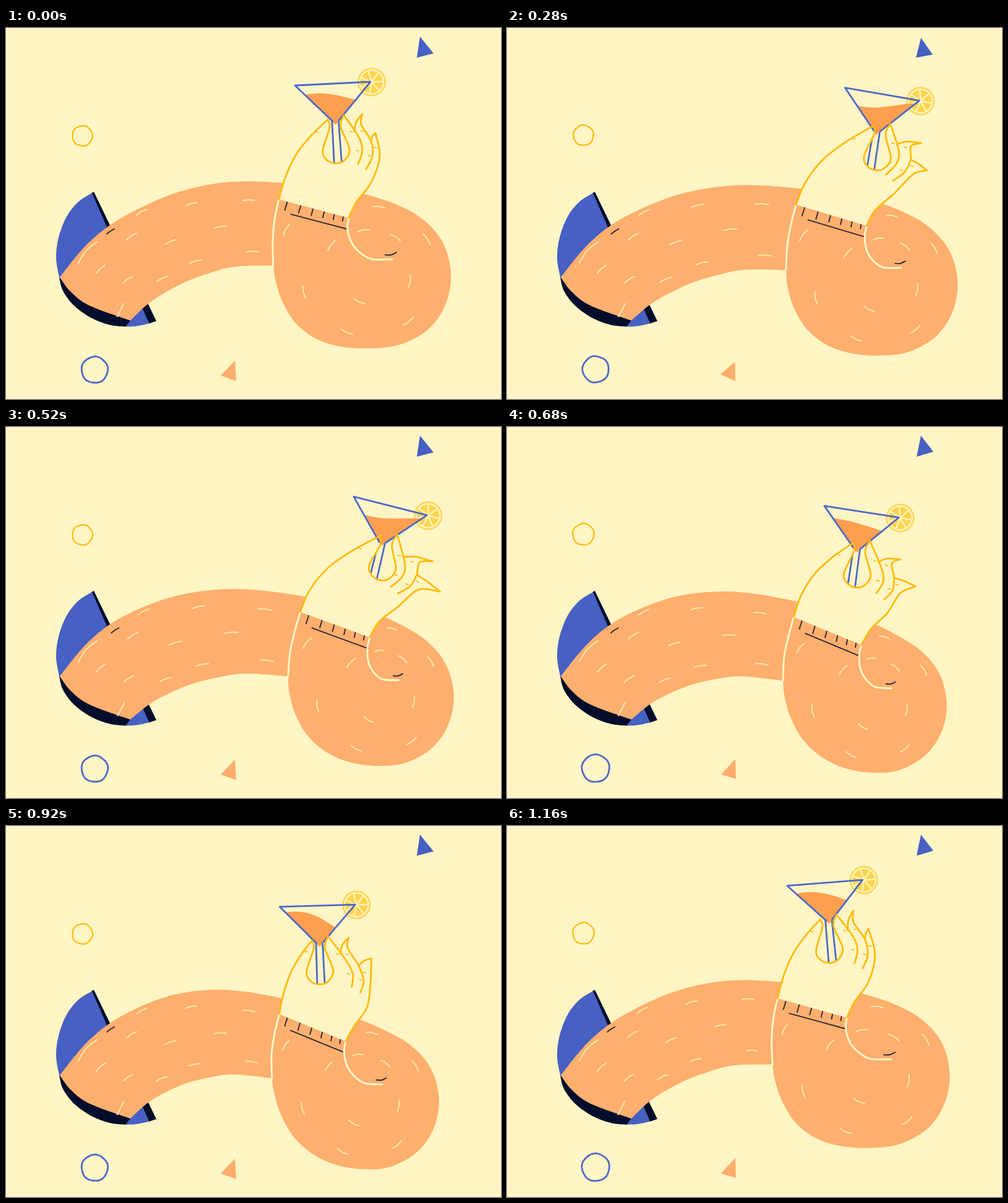
An HTML page with a canvas that plays this animation: 800 px wide and 600 px high, repeating every 1200 ms.

```html
<!DOCTYPE html>
<html lang="en">
<head>
<meta charset="utf-8">
<title>Cocktail arm</title>
<style>
html, body { margin: 0; width: 100%; height: 100%; overflow: hidden; background: #fff5c5; }
canvas { display: block; width: 800px; height: 600px; }
</style>
</head>
<body>
<canvas id="stage" width="800" height="600"></canvas>
<script>
const ctx = document.getElementById('stage').getContext('2d');
const CREAM = '#fff5c5', SKIN = '#ffaf6e', BLUE = '#4660c3', DARK = '#020d2b';
const GOLD = '#ffbb0a', INK = '#2b2838', DRINK = '#ff9f50', LEMON = '#ffd44f';
const LINE = '#4c69c9', PITH = '#fff3b8', HAIR = '#ffe6ad';
const TAU = Math.PI * 2;

// Two motions drive everything: the wrist sways sideways and the elbow dips.
const LOOP = 1200, STEP = 80, HOLD = 120;
const KEYS = [0, 120, 280, 520, 760, 1000, 1160];
const SWAY = [0, 6, 28, 37, 16, -5, -4];
const DIP = [0, 1, 14, 36, 52, 36, 3];
let sway = 0, dip = 0, tilt = 0, time = 0;

const pairs = list => {
  const out = [];
  for (let i = 0; i < list.length; i += 2) out.push([list[i], list[i + 1]]);
  return out;
};
const add = (p, dx, dy) => [p[0] + dx, p[1] + dy];
const lerp = (a, b, k) => [a[0] + (b[0] - a[0]) * k, a[1] + (b[1] - a[1]) * k];
const ramp = (x, from, to) => {
  const u = Math.min(1, Math.max(0, (x - from) / (to - from)));
  return u * u * (3 - 2 * u);
};

// Periodic cubic through the key values.
function keyed(values, t) {
  const n = KEYS.length;
  const at = i => KEYS[(i + n) % n] + LOOP * Math.floor(i / n);
  const val = i => values[(i + n) % n];
  const slope = i => (val(i + 1) - val(i - 1)) / (at(i + 1) - at(i - 1));
  let i = n - 1;
  while (at(i) > t) i--;
  const d = at(i + 1) - at(i), u = (t - at(i)) / d, v = 1 - u;
  return val(i) + (val(i + 1) - val(i)) * u * u * (3 - 2 * u)
    + d * u * v * (v * slope(i) - u * slope(i + 1));
}

// Arm and elbow: fixed at the sleeve, looser to the right, widest sway at the wrist.
function bend([x, y]) {
  const wrist = Math.exp(-((x - 510) ** 2 + (y - 290) ** 2) / 11000);
  const side = 0.55 * ramp(x, 150, 420) + 0.6 * wrist;
  const back = 0.06 * ramp(x, 170, 400) * ramp(y, 290, 360) + 0.38 * ramp(x, 480, 680);
  const down = ramp(x, 170, 670) * (1.03 - 0.0008 * (y - 350));
  return [x + sway * side - dip * back, y + dip * down];
}
const bent = list => pairs(list).map(bend);

// Hand: leans more the higher a point is above the cuff; fan spreads the fingertips.
function lean([x, y], fan = 0) {
  const height = 277 + (x - 441) * 0.265 - y;
  const k = (height / 110) ** 2;
  const spread = Math.max(0, x - 540) * 0.008 * k;
  return [
    x + sway * (1 + k + 0.1 * fan) - dip * (0.05 + 0.3 * k - 0.2 * fan),
    y + sway * (spread + 0.42 * fan) + dip * (0.85 + (x - 540) * 0.002)
  ];
}
const leant = (list, fan) => pairs(list).map(p => lean(p, fan));

// Thumb and index move as one piece around the stem.
function pinch(list) {
  const pivot = [533, 150], [px, py] = lean(pivot);
  const c = Math.cos(tilt * 0.7), s = Math.sin(tilt * 0.7);
  return pairs(list).map(([x, y]) => {
    const dx = x - pivot[0], dy = y - pivot[1];
    return [px + dx * c - dy * s, py + dx * s + dy * c];
  });
}

// Adds a smooth run through the points to the current path.
function run(pts, join) {
  if (join) ctx.lineTo(...pts[0]);
  else ctx.moveTo(...pts[0]);
  for (let i = 0; i < pts.length - 1; i++) {
    const a = pts[i], b = pts[i + 1];
    const p = pts[i - 1] || a, n = pts[i + 2] || b;
    ctx.bezierCurveTo(
      a[0] + (b[0] - p[0]) / 6, a[1] + (b[1] - p[1]) / 6,
      b[0] - (n[0] - a[0]) / 6, b[1] - (n[1] - a[1]) / 6, b[0], b[1]);
  }
}
function trace(runs) {
  ctx.beginPath();
  runs.forEach((r, i) => run(r, i > 0));
}
function fill(color, ...runs) {
  trace(runs);
  ctx.fillStyle = color;
  ctx.fill();
}
function stroke(color, width, ...runs) {
  trace(runs);
  ctx.strokeStyle = color;
  ctx.lineWidth = width;
  ctx.stroke();
}

function ring(x, y, r, color, width, phase) {
  const pts = [];
  for (let a = 0; a < TAU + 0.1; a += TAU / 30) {
    const q = r + 0.4 * Math.cos(5 * a + phase);
    pts.push([x + q * Math.cos(a), y + q * Math.sin(a)]);
  }
  stroke(color, width, pts);
}

// Loose shapes jitter between three drawings.
function drawConfetti(k) {
  const left = [0, 2, 3][k], low = k === 2 ? 2 : 0, grow = k === 1 ? 1 : 0;
  fill(BLUE, [[669, 14 + low]], [[691 - left, 41 + low - grow]], [[664 - left, 48]]);
  fill('#ffad6c', [[370 - left / 2, 538 + low - grow]], [[372 - left, 571 - 2 * grow]], [[347 - left * 0.7, 562 - low]]);
  ring(123.5, k ? 173.5 : 174.5, 16.3 + grow, GOLD, 2.2, k);
  ring(143.3, k ? 552 : 552.8, 21.2 + grow, LINE, 2.8, k + 1);
}

function drawSleeve() {
  fill(DARK, [[142, 265]], [[243, 474]], [[231, 478]], [[138, 267]]);
  fill(BLUE, pairs([139, 267, 117, 281, 98, 305, 85, 339, 81, 372, 86, 403]),
    pairs([193, 483, 212, 482, 231, 478]));
  fill(DARK, pairs([86, 403, 92, 425, 110, 449, 138, 469, 167, 480, 193, 483]),
    pairs([201, 473, 135, 447, 86, 403]));
}

function hair(p, angle, half, bow) {
  const c = Math.cos(angle), s = Math.sin(angle);
  stroke(HAIR, 2, [add(p, -c * half, -s * half), add(p, s * bow, -c * bow), add(p, c * half, s * half)].map(bend));
}

function drawHairs() {
  pairs([219, 298, 299, 285, 392, 279, 203, 337, 266, 346, 347, 322, 153, 390, 197, 407, 252, 406, 306, 378, 399, 362])
    .forEach(p => hair(p, (p[0] - 400) * 0.003, 9.5, 1));
  hair([185, 456], -1.1, 12, 0);
  hair([132, 363], -0.85, 23, 4);
  const hub = [590, 400];
  pairs([453, 327, 526, 352, 482, 427, 572, 442, 551, 491, 650, 474, 652, 409, 680, 342, 629, 339, 602, 290, 578, 328])
    .forEach(p => hair(p, Math.atan2(p[1] - hub[1], p[0] - hub[0]) + TAU / 4, 10, 1.5));
}

function drawArm() {
  const seam = bent([441, 277, 434, 310, 431, 345, 432, 384]);
  const wrist = seam[0], cuff = bend([554, 307]);
  fill(SKIN,
    [[87, 403], ...bent([126, 355, 165, 321, 211, 294, 270, 268, 330, 253, 390, 248, 470, 252])],
    seam,
    [...bent([432, 384, 370, 386, 330, 396, 285, 413, 235, 442]), [201, 473]],
    pairs([201, 473, 135, 449, 104, 426, 87, 403]));
  fill(SKIN,
    bent([432, 384, 436, 410, 447, 443, 468, 477, 500, 502, 540, 515, 590, 518, 640, 511, 685, 485,
      711, 445, 719, 397, 706, 347, 673, 309, 625, 283, 556, 262]),
    [cuff], seam);
  drawHairs();

  for (let i = 0; i < 6; i++) {
    const top = add(lerp(wrist, cuff, 0.12 + 0.2 * i - 0.008 * i * i), 0, 1);
    stroke(INK, 1.9, [top, add(top, -4 + 0.6 * i, 13 - 1.3 * i)]);
  }
  stroke(INK, 1.9, [add(lerp(wrist, cuff, 0.17), 0, 19), add(cuff, -3, 18)]);
  stroke(INK, 1.9, pairs([163, 333, 168, 329, 175, 325]).map(p => add(p, sway * 0.2, 0)));
  stroke(INK, 1.9, bent([613, 367, 622, 367, 631, 363]));
  stroke(CREAM, 3, seam);
  stroke(CREAM, 3, bent([554, 307, 552, 325, 559, 348, 573, 364, 592, 374, 624, 374]));
}

function drawLemon(x, y) {
  const disc = (r, color) => {
    ctx.beginPath();
    ctx.arc(x, y, r, 0, TAU);
    ctx.fillStyle = color;
    ctx.fill();
  };
  disc(23, LEMON);
  disc(20.6, PITH);
  disc(18, LEMON);
  for (let a = 0; a < TAU - 0.1; a += TAU / 7) {
    stroke(PITH, 2.6, [[x, y], [x + 18 * Math.cos(a), y + 18 * Math.sin(a)]]);
  }
}

function placeGlass() {
  ctx.translate(528 + 3.1 * sway - 0.6 * dip, 90 + 0.17 * sway + 0.87 * dip);
  ctx.rotate(tilt - 0.049);
}

function drawDrink() {
  const slope = (10 - 1.05 * sway + 0.48 * dip) / 100;
  const wave = 8 * Math.cos(TAU * (time - 380) / LOOP) - 2;
  const top = [];
  for (let x = -61; x <= 61; x += 6.1) {
    top.push([x, 20 + slope * (x + 20) + wave * Math.cos((x + 15) / 25)]);
  }
  ctx.save();
  trace([[[-61, 0]], [[61, 0]], [[7, 60], [1.5, 66], [-3, 61]]]);
  ctx.clip();
  fill(DRINK, top, [[61, 70]], [[-61, 70]]);
  ctx.restore();
}

function drawGlass(grip) {
  ctx.save();
  trace([grip]);
  ctx.clip();
  placeGlass();
  stroke(LINE, 2.8, [[-4, 60], [-4, 140]]);
  stroke(LINE, 2.8, [[6.5, 60], [8.5, 140]]);
  ctx.restore();

  ctx.save();
  placeGlass();
  drawLemon(63, 0.5);
  drawDrink();
  stroke(LINE, 2.8, [[-3, 61]], [[-61, 0]], [[61, 0]], [[7, 60]]);
  ctx.restore();
}

function drawHand() {
  const wrist = bend([441, 277]), cuff = bend([554, 307]);
  const grip = pinch([520, 148, 523, 161, 512, 198, 518, 213, 533, 219, 548, 213, 555, 195, 541, 160, 546, 141]);
  const thumb = grip[0], index = grip[grip.length - 1];
  const outer = [wrist, ...leant([452, 240, 470, 203, 494, 173]), thumb];
  const second = [index, ...leant([570, 176, 576, 198, 569, 220])];
  const third = leant([590, 183, 592, 208, 582, 228]);
  const tip3 = lean([576, 139], 1.2), tip4 = lean([597, 170], 2);
  const side = [tip4, ...leant([604, 208, 590, 250, 566, 282]), cuff];

  fill(CREAM, outer, second.slice(0, 2), [third[0]], side.slice(1));
  drawGlass(grip);

  stroke(GOLD, 2.8, outer, grip, second);
  stroke(GOLD, 2.8, [lean([563, 167]), lean([566, 152], 0.6), tip3],
    [tip3, lean([574, 156], 0.6), ...third]);
  stroke(GOLD, 2.8, [third[0], lean([592, 175], 1), tip4], side);
  leant([503, 169, 558, 168, 575, 167, 568, 199, 587, 207, 597, 194])
    .forEach(p => stroke(GOLD, 1.7, [add(p, -2, -1), add(p, 2, 0)]));
}

function draw(now) {
  const t = now % LOOP;
  time = t < HOLD ? 0 : HOLD + Math.floor((t - HOLD) / STEP) * STEP;
  sway = keyed(SWAY, time);
  dip = keyed(DIP, time);
  tilt = (0.44 * sway + 0.02 * dip) * Math.PI / 180;
  ctx.fillStyle = CREAM;
  ctx.fillRect(0, 0, 800, 600);
  ctx.lineCap = ctx.lineJoin = 'round';
  drawConfetti(Math.floor((t + 40) / 160) % 3);
  drawSleeve();
  drawArm();
  drawHand();
}

const start = performance.now();
function tick() {
  draw(performance.now() - start);
  requestAnimationFrame(tick);
}
tick();
</script>
</body>
</html>
```
